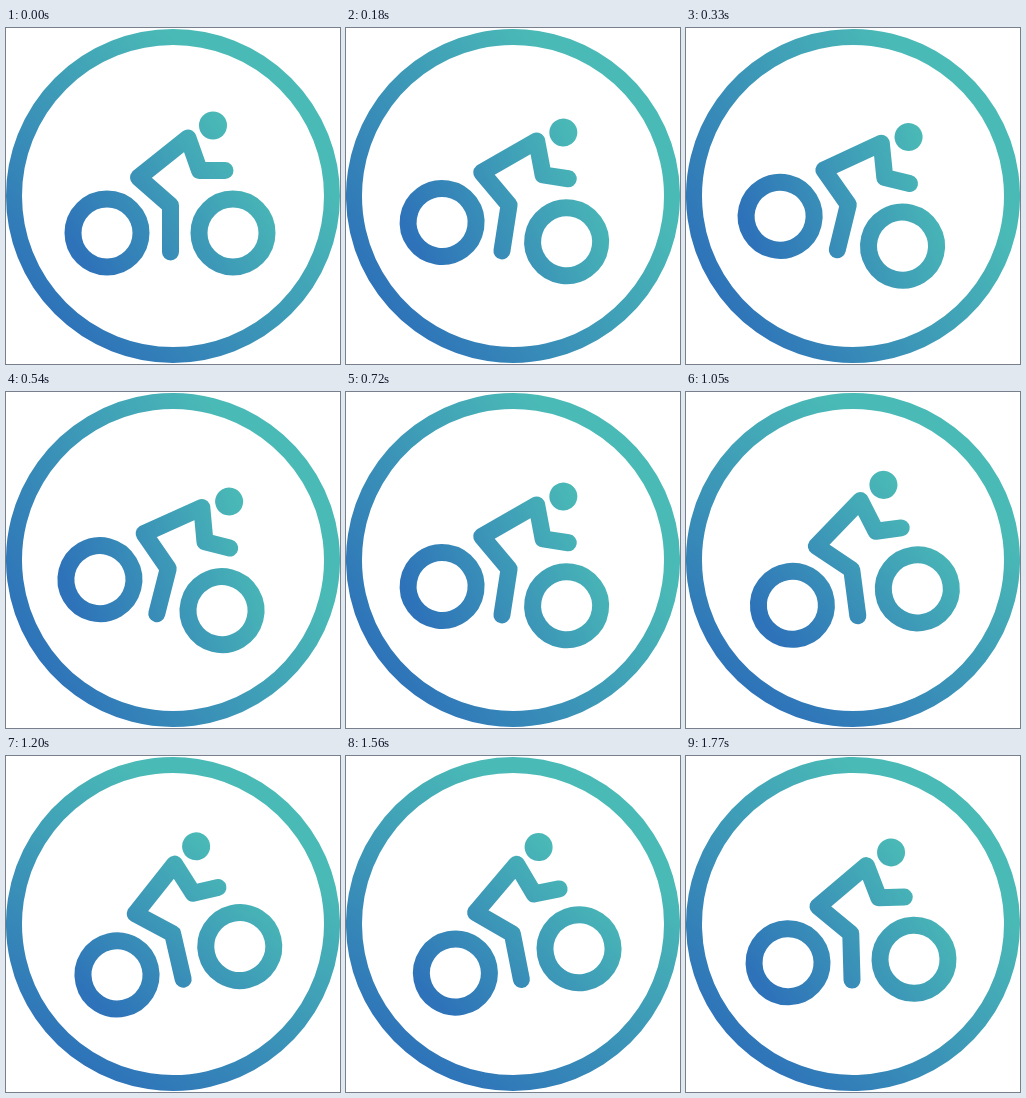
An HTML page that plays this animation: 334 by 336 pixels, repeating every 1.8 s.

```html
<!DOCTYPE html>
<html lang="en">
<head>
<meta charset="utf-8">
<title>Rocking cyclist</title>
<style>
  html, body { margin: 0; width: 100%; height: 100%; overflow: hidden; background: #fff; }
  svg { display: block; width: 334px; height: 336px; }
</style>
</head>
<body>
<svg viewBox="0 0 334 336">
  <defs>
    <linearGradient id="tint">
      <stop offset="0" stop-color="#2e73b9"/>
      <stop offset="1" stop-color="#4abab6"/>
    </linearGradient>
    <linearGradient id="ringTint" href="#tint" gradientUnits="userSpaceOnUse" x1="49" y1="286" x2="247" y2="88"/>
    <linearGradient id="bikeTint" href="#tint" gradientUnits="userSpaceOnUse" x1="80" y1="232" x2="240" y2="120"/>
  </defs>
  <g id="badge" fill="none" stroke-linecap="round" stroke-linejoin="round">
    <circle cx="167" cy="168" r="159" stroke="url(#ringTint)" stroke-width="16"/>
    <g stroke="url(#bikeTint)" stroke-width="17">
      <circle cx="101" cy="205" r="34"/>
      <circle cx="227" cy="205" r="34"/>
      <path d="M164.5 224V177.500L132.500 149.500L182 110L193.500 142.500H219"/>
    </g>
    <circle cx="207" cy="97.500" r="14" fill="url(#bikeTint)"/>
  </g>
</svg>
<script>
  const LOOP = 1800, STEP = 30, SWING = 15;
  const badge = document.getElementById('badge');
  const start = performance.now();

  function draw() {
    const t = Math.floor((performance.now() - start) / STEP) * STEP;
    const angle = SWING * Math.sin(2 * Math.PI * t / LOOP);
    badge.setAttribute('transform', `rotate(${angle} 167 168)`);
    requestAnimationFrame(draw);
  }
  draw();
</script>
</body>
</html>
```
